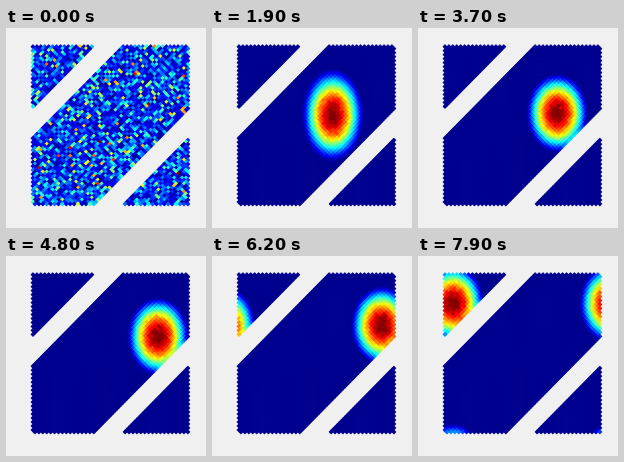
Animation of 200x200 px, one loop 8000 ms. Source, as a matplotlib script:

```python
import numpy as np
import matplotlib.pyplot as plt
from matplotlib.animation import FuncAnimation
from matplotlib.collections import PolyCollection
from matplotlib.colors import ListedColormap

SIZE, DPI = 200, 100
STEP, FRAMES, HOLD = 100, 80, 6
N = 80                        # half-cells per side of the wrapped sheet
HX, HY = 1.96, 1.99           # half a cell in pixels
X0, Y0 = 27.0, 18.7
PERIOD = np.array([N * HX, N * HY])

# staggered lattice with a diagonal band left empty
row, col = np.mgrid[0:N, 0:N]
diag = (row + col) % N
keep = (diag % 2 == 0) & ~((diag > 30) & (diag < 46))
pos = np.column_stack([X0 + HX * col[keep], Y0 + HY * row[keep]])
diamond = np.array([[0, -HY], [HX, 0], [0, HY], [-HX, 0]])

noise = np.random.default_rng(4).gamma(1.5, 0.13, (N, N))

# 64-level rainbow from dark blue to dark red
level = np.arange(1, 65) / 64
rainbow = ListedColormap(np.column_stack(
    [np.clip(1.5 - np.abs(4 * level - k), 0, 1) for k in (3, 2, 1)]))

# path of the bump's centre
times = np.array([1.2, 2.7, 3.7, 4.8, 6.2, 7.9])
path_x = np.polyfit(times, [114.5, 129, 139, 152, 170, 192], 3)
path_y = np.polyfit(times, [87, 87, 86, 82, 69.5, 48.5], 3)


def smooth(field, sigma):
    f = np.fft.fftfreq(N)
    gain = np.exp(-2 * (np.pi * sigma) ** 2 * (f[:, None] ** 2 + f ** 2))
    out = np.fft.ifft2(np.fft.fft2(field) * gain).real
    return (out - out.min()) / (out.max() - out.min())


def bump(t):
    centre = np.array([np.polyval(path_x, t), np.polyval(path_y, t)])
    decay = min(np.exp(-(t - 1.2) / 0.45), 1.5)
    radius = np.array([31 + 4 * decay, 39.5 + 38 * decay])
    d = (pos - centre + PERIOD / 2) % PERIOD - PERIOD / 2
    r2 = ((d / radius) ** 2).sum(axis=1)
    return np.clip(1 - r2, 0, None) ** (1.3 + decay)


def activity(n):
    if n < HOLD:
        return noise[keep]
    t = n * STEP / 1000
    rng = np.random.default_rng(100 + n)
    value = bump(t)
    w = min((n - HOLD + 1) / 6, 1)
    w = w * w * (3 - 2 * w)
    if w < 1:
        blur = smooth(noise, 1.5 + 1.2 * (n - HOLD))[keep]
        value = (1 - w) * blur ** 1.5 + w * value
    return value * (1 + 0.02 * rng.standard_normal(len(value)))


fig = plt.figure(figsize=(SIZE / DPI, SIZE / DPI), dpi=DPI, facecolor="#f0f0f0")
ax = fig.add_axes([0, 0, 1, 1])
ax.set_xlim(0, SIZE)
ax.set_ylim(SIZE, 0)
ax.axis("off")

cells = PolyCollection(pos[:, None, :] + diamond, array=noise[keep], cmap=rainbow,
                       edgecolors="face", linewidths=0.6)
cells.set_clim(0, 1)
ax.add_collection(cells)


def draw(n):
    cells.set_array(np.clip(activity(n), 0, 1))
    return [cells]


anim = FuncAnimation(fig, draw, frames=FRAMES, interval=STEP, repeat=True,
                     repeat_delay=0, blit=False)
plt.show()
```
